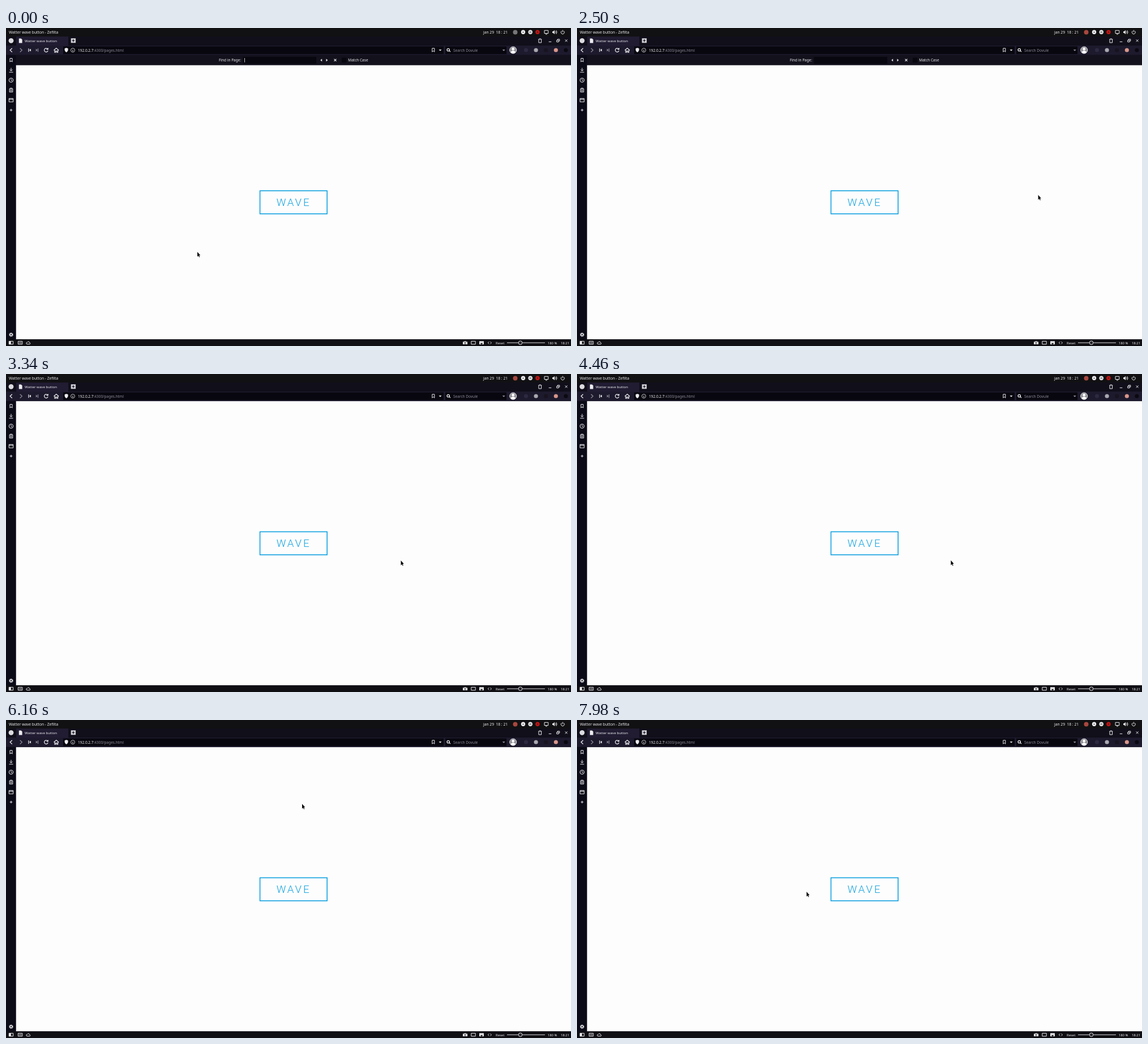
Animation of 998 by 561 pixels, one loop 8 s. Source, as an HTML page:

```html
<!DOCTYPE html>
<html lang="en">
<head>
<meta charset="utf-8">
<title>Wave button</title>
<style>
  html, body { margin: 0; width: 100%; height: 100%; overflow: hidden; background: #0c0b17; }
  svg { display: block; width: 100vw; height: 100vh; }
  text { font-family: "Noto Sans", sans-serif; white-space: pre; }
  .wave { font-family: Roboto, sans-serif; font-weight: 300; font-size: 18.7px; letter-spacing: 2.81px; fill: #12a2e0; }
</style>
</head>
<body>
<svg id="stage" viewBox="0 0 998 561" preserveAspectRatio="none">
  <rect id="page" x="17.5" width="981" fill="#fdfdfd"/>
  <g id="button">
    <rect x="448.6" y="287.2" width="118.6" height="40.6" fill="none" stroke="#12a2e0" stroke-width="1.6"/>
    <text class="wave" x="477.7" y="313.9">WAVE</text>
  </g>
  <g id="chrome"></g>
  <g id="find"></g>
  <path id="cursor" d="M0 0V8.4L1.9 6.7 3.2 9.6 4.3 9.1 3.1 6.3 5.3 6Z" fill="#080808" stroke="#fff" stroke-width=".6" paint-order="stroke"/>
</svg>
<script>
const LOOP = 8000, BLUR = 820, CLOSE = 2740, SETTLE = 2820;
const LEFT = 17.5, BAR = 47.7, FIND = 17.7, BOTTOM = 549.3;
const INK = "#ececef", MUTED = "#8d8b98", FIELD = "#08070f";
const $ = id => document.getElementById(id);

function set(node, attrs) {
  for (const k in attrs) node.setAttribute(k, attrs[k]);
  return node;
}

let layer = $("chrome");
const add = (tag, attrs) =>
  layer.appendChild(set(document.createElementNS("http://www.w3.org/2000/svg", tag), attrs));
const box = (x, y, width, height, fill) => add("rect", { x, y, width, height, fill });
const disc = (cx, cy, r, fill, more) => add("circle", { cx, cy, r, fill, ...more });
const ring = (x, y, r, w = 1) => disc(x, y, r, "none", { stroke: INK, "stroke-width": w });
const label = (x, y, s, size = 6.5, fill = INK) =>
  add("text", { x, y, "font-size": size, fill }).textContent = s;

// outlines drawn around their own centre
const outlines = {
  bookmark: "M-2-3.3h4v6.4L0 1.2l-2 1.9z",
  download: "M0-4V1M-2.5-1L0 1.3 2.5-1M-3.5 3.6h7",
  clock: "M0-2.2V.3l1.8 1",
  note: "M-2.8-2.6h5.6v6h-5.6zM-2-3.4h4M-1.5-.4h3M-1.5 1.5h3",
  window: "M-3.7-2.9h7.4v6h-7.4zM-3.7-1.2h7.4",
  plus: "M-2.3 0h4.6M0-2.3v4.6",
  minus: "M-2.3 2h4.6",
  close: "M-2-2l4 4M2-2l-4 4",
  restore: "M-2.5-.6h3.4v3h-3.4zM-1-.8v-1.6h3.6v3.1H1.2",
  trash: "M-3-2.4h6M-1-3.4h2M-2.3-2.2v5.8h4.6v-5.8",
  back: "M1.8-3.4L-1.8 0l3.6 3.4",
  forward: "M-1.8-3.4L1.8 0l-3.6 3.4",
  reload: "M2.6-1.9a3.3 3.3 0 1 0 .5 2.7M3.2-3.9v2.5H.6",
  home: "M-4.3.2L0-3.6 4.3.2M-2.8 0v3.8H-1V1.4h2v2.4h1.8V0",
  screen: "M-3.4-3.2h6.8v5.2h-6.8zM-1.5 3.5h3",
  waves: "M1.8-1.9q1.6 1.9 0 3.8M3.2-3.2q2.6 3.2 0 6.4",
  power: "M-1.8-2.1a3 3 0 1 0 3.6 0M0-3.7v3.5",
  panel: "M-3.7-2.6h7.4v5.2h-7.4z",
  code: "M-1.2-2l-1.8 2 1.8 2M1.2-2L3 0 1.2 2",
  cloud: "M-2.4 2.3a1.6 1.6 0 0 1 .4-3.2 2.2 2.2 0 0 1 4.1.7 1.3 1.3 0 0 1 .3 2.5z",
  pause: "M-1.2-1.3v2.6M1.2-1.3v2.6",
  handle: "M1 1l2.4 2.4"
};
const solids = {
  down: "M-2.5-1.2h5L0 1.5z",
  prev: "M1.4-2.5v5L-1.4 0z",
  next: "M-1.4-2.5v5L1.4 0z",
  speaker: "M-4-1.3h1.6L0-3.6v7.2l-2.4-2.3H-4z",
  sheet: "M-2.9-3.7H.9l2 2v5.8h-5.8z",
  shield: "M-3-3l3-1 3 1V0q-.3 2.8-3 4-2.7-1.2-3-4z",
  bust: "M-4.2 4.2q.6-3.3 4.2-3.3t4.2 3.3q-4.2 3.4-8.4 0z",
  camera: "M-4-1.8h2l1-1h2l1 1h2v4.6h-8z",
  photo: "M-4-2.8h8v5.6h-8z"
};

function icon(name, x, y, color = INK, width = 1) {
  const line = name in outlines;
  add("path", {
    d: line ? outlines[name] : solids[name], transform: `translate(${x} ${y})`,
    fill: line ? "none" : color, stroke: line ? color : "none", "stroke-width": width
  });
}

function topBar() {
  box(0, 0, 998, 15, "#111113");
  label(5, 9.8, "Watter wave button - Zefilta", 6.7);
  label(843, 10, "jan 29  18 : 21", 6.7);
  disc(899.5, 7.5, 4).id = "rec";
  ["minus", "restore", "close"].forEach((name, i) => {
    disc(913.5 + 12.7 * i, 7.3, 3.7, i < 2 ? INK : "#c81414");
    const glyph = layer.appendChild(set(document.createElementNS("http://www.w3.org/2000/svg", "path"), {
      d: [outlines.minus, outlines.panel, outlines.close][i], fill: "none", stroke: "#222", "stroke-width": 1.6
    }));
    set(glyph, { transform: `translate(${913.5 + 12.7 * i} ${i ? 7.3 : 6.2}) scale(${i === 1 ? .36 : .58})` });
  });
  icon("screen", 954.4, 7.5);
  icon("speaker", 969, 7.4);
  icon("waves", 968.6, 7.4);
  icon("power", 983.3, 7.3);
}

function tabBar() {
  box(0, 15, 998, 16, "#100f1a");
  box(18, 15, 92, 16, "#211c32");
  disc(9, 22.3, 4.4, "#dcdce0");
  icon("sheet", 25.7, 22.3);
  label(33, 24.7, "Watter wave button", 6.15);
  box(114.7, 18.2, 8.4, 8, "#d2d2d6");
  icon("plus", 118.9, 22.2, "#1b1828", 1.3);
  icon("trash", 943.3, 22.3);
  icon("minus", 961, 22.3);
  icon("restore", 975.2, 22.2);
  icon("close", 989.6, 22.3);
}

function addressBar() {
  box(0, 31, 998, BAR - 31, "#1e1a2d");
  box(101, 32.5, 672, 13.5, FIELD);
  box(776, 32.5, 108, 13.5, FIELD);
  icon("back", 9, 39.1, INK, 1.3);
  icon("forward", 26.5, 39.1, MUTED, 1.3);
  box(39.4, 36.1, 1.2, 6, INK);
  icon("prev", 42.6, 39.1);
  icon("next", 54.2, 39.1, MUTED);
  box(55.9, 36.1, 1.2, 6, MUTED);
  icon("reload", 71, 39.1, INK, 1.2);
  icon("home", 88.8, 39.1, INK, 1.2);
  icon("shield", 106.6, 39.1);
  ring(118, 39.1, 3.5, .8);
  box(117.5, 38.4, 1, 2.8, INK);
  label(127, 41.5, "192.0.2.7");
  label(154.5, 41.5, ":4300/pages.html", 6.5, MUTED);
  icon("bookmark", 754.8, 39.1);
  icon("down", 767, 39.1);
  ring(781.2, 38.5, 2.2, 1.3);
  icon("handle", 781.6, 38.6, INK, 1.2);
  label(790, 41.5, "Search Dovule", 6.5, MUTED);
  icon("down", 879.2, 39.2, MUTED);
  disc(895.7, 39, 6, "#8b8a90", { stroke: "#e6e6e8" });
  disc(895.7, 36.9, 2.5, "#fff");
  icon("bust", 895.7, 39, "#fff");
  ["#2c2941", "#a9a8b0", "#17141f", "#d9968a", "#0a0910"].forEach((c, i) =>
    disc(918.5 + 17.6 * i, 39, 3.6, c));
}

function sidePanel() {
  box(0, BAR, LEFT, 501.6, "#0b0a17");
  ["bookmark", "download", "clock", "note", "window", "plus"].forEach((name, i) =>
    icon(name, 9, 56.8 + 17.6 * i));
  ring(9, 92, 3.7);
  ring(9, 541, 2, 1.6);
  set(ring(9, 541, 3.2, 1.1), { "stroke-dasharray": "1.25 1.26" });
}

function statusBar() {
  box(0, BOTTOM, 998, 12, "#0f0f14");
  icon("panel", 9, 555.3);
  box(5.3, 552.7, 3.5, 5.2, INK);
  icon("panel", 25.1, 555.3);
  icon("pause", 25.1, 555.3);
  icon("cloud", 39.6, 555.4);
  icon("camera", 811, 555.3);
  disc(811, 555.7, 1.4, "none", { stroke: "#111", "stroke-width": .8 });
  icon("panel", 825.5, 555.3);
  icon("photo", 840, 555.3);
  icon("down", 840, 557, "#111");
  icon("code", 854.4, 555.4);
  label(865, 557.6, "Reset", 5.9);
  box(885, 554.8, 67, 1.1, "#c9c9ce");
  disc(908.5, 555.3, 3.3, "#24232b", { stroke: INK, "stroke-width": .9 });
  label(956.8, 557.6, "180 %", 5.9);
  label(980, 557.6, "18:21", 5.9);
}

function findBar() {
  layer = $("find");
  box(LEFT, BAR, 981, FIND, "#12111c");
  box(418.5, 51, 129.5, 12, FIELD);
  box(593, 52.5, 8.5, 8.5, FIELD);
  label(376, 59.2, "Find in Page:");
  label(604.3, 59.2, "Match Case");
  icon("prev", 556.8, 56.7);
  icon("next", 566.9, 56.7);
  icon("close", 581.5, 56.7, INK, 1.2);
  box(421, 53, .8, 7.6, INK).id = "caret";
}

// pointer strokes: start and end time, end point, bend point
const home = [338, 395];
const moves = [
  [820, 1560, [854, 280], [560, 470]],
  [2260, 2960, [745, 319], [795, 302]],
  [3080, 3480, [681, 333], [700, 328]],
  [3640, 4040, [675, 332], [679, 333]],
  [4220, 4600, [657, 328], [659, 328.6]],
  [4740, 5180, [547.5, 320.5], [600, 330]],
  [5340, 5480, [618.5, 331.5], [580, 331]],
  [5580, 6140, [523, 148], [870, 250]],
  [6160, 6880, [406, 309.5], [240, 225]],
  [6980, 7140, [437, 315], [422, 312]],
  [7580, 7980, [405.5, 303], [420, 307]]
];

function pointer(t) {
  let from = home;
  for (const [t0, t1, to, bend] of moves) {
    if (t < t0) break;
    const u = Math.min(1, (t - t0) / (t1 - t0)), v = 1 - u, a = from;
    from = to.map((end, k) => a[k] * v * v + 2 * bend[k] * u * v + end * u * u);
  }
  return from;
}

function draw(t) {
  const open = t < CLOSE;
  const top = open ? BAR + FIND : BAR;
  const bottom = !open && t < SETTLE ? BOTTOM - FIND : BOTTOM;
  const [x, y] = pointer(t);
  set($("page"), { y: top, height: bottom - top });
  set($("button"), { transform: `translate(0 ${open ? 0 : -FIND / 2})` });
  set($("find"), { visibility: open ? "visible" : "hidden" });
  set($("caret"), { opacity: t < BLUR ? 1 : 0 });
  set($("rec"), { fill: t < 400 ? "#77777b" : "#a8473f" });
  set($("cursor"), { transform: `translate(${x.toFixed(2)} ${y.toFixed(2)})` });
}

[topBar, tabBar, addressBar, sidePanel, statusBar, findBar].forEach(part => part());

let start;
function tick(now) {
  start ??= now;
  draw((now - start) % LOOP);
  requestAnimationFrame(tick);
}
draw(0);
requestAnimationFrame(tick);
</script>
</body>
</html>
```
